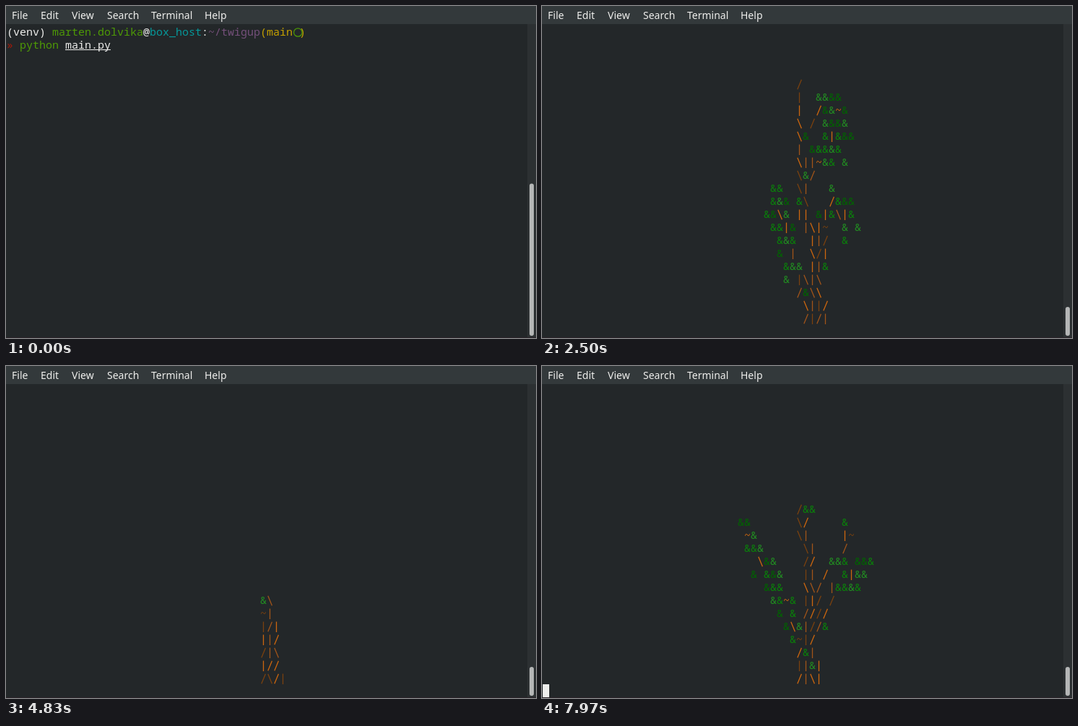
Recreate the animation shown at these times as an HTML page with a canvas. Size 734 by 459 pixels, loop 8000 ms.

```html
<!DOCTYPE html>
<html lang="en">
<head>
<meta charset="utf-8">
<title>Terminal trees</title>
<style>
  html, body { margin: 0; width: 100%; height: 100%; overflow: hidden; background: #232729; }
  canvas { display: block; }
</style>
</head>
<body>
<canvas id="stage" width="734" height="459"></canvas>
<script>
const ctx = document.getElementById('stage').getContext('2d');
const LOOP = 8000;
const CELL_W = 9, CELL_H = 18, LEFT = 1, TOP = 26;
const LAST_ROW = 23, ART_COL = 30;

const MONO = '15px "Noto Sans Mono", "DejaVu Sans Mono", monospace';
const SANS = '14px "Noto Sans", "Open Sans", sans-serif';
const WHITE = '#eeeeec', GREEN = '#4e9a06', CYAN = '#06989a';
const PURPLE = '#75507b', YELLOW = '#c4a000', RED = '#a81808';

const LEAF = { a: '#006400', b: '#0a800a', c: '#228b22' };
const WOOD = { a: '#7a410f', b: '#a0541a', c: '#cc660f' };

const MENU = [['File', 8], ['Edit', 48], ['View', 91], ['Search', 140], ['Terminal', 201], ['Help', 275]];

// Each line: glyphs, then one tone per glyph. Capital tones appear on the last step.
const ART_TALL = String.raw`
.................& B
........./.....&|& aBCB
.........|..&&&&/& accaaCB
.........|../&&~&& ccaccaB
.........\./.&&&& cacaac
.........\&..&|&&& cabcbaa
.........|.&&&&& babbcb
.........\||~&&.& cbbccbc
.........\&/ acb
.....&&..\|...& bbabc
.....&&&.&\.../&&& bcabacbaa
....&&\&.||.&|&\|& baccccacbbcb
.....&&|&.|\|~..&.& bbcabccacc
......&&&..||/..& bcbcbab
......&.|..\/| abcac
.......&&&.||& bcccbb
.......&.|\|\ cabbb
........./&\\ babc
..........\||/ cbac
........../|/| babb`;

const ART_SMALL = String.raw`
......|.......&&& cacb
.......|......&~ bcc
........\..../&.& acbb
...\&&...|.&/ acacab
...&&&.&.||&& cabbccbc
...&.~~&\&\ abcaacb
......&&.&| ccbb
.........|/| abc
.........||/ cbc
........./|\ abb
.........|// ccc
........./\/| aaca`;

const ART_WIDE = String.raw`
........./&& ABB
&&.......\/.....& AAACB
.~&......\|.....|~ ccabca
.&&&......\|..../ bbcabb
...\&&....//..&&&.&&& cacacccbAAB
..&.&&&...||./..&|&& abacabcbccC
....&&&...\\/.|&&&& abbcbbbbbCb
.....&&~&.||/./ cbcbacaa
......&.&.//// abbcac
.......&\&|//& accbabb
........&~|/ baac
........./&| cbb
.........||&| abcc
........./|\| cbcc`;

// `bud` is a twig that a leaf replaces once its step is reached.
const TREES = [
  {
    art: ART_TALL, trunk: 42, lean: 0.013,
    bud: { row: 18, col: 43, ch: '|', tone: 'a', until: 6 },
    steps: [670, 770, 870, 970, 1070, 1130, 1200, 1270, 1370, 1470, 1600, 1700,
            1870, 1970, 2070, 2130, 2230, 2330, 2470, 2670],
    prompt: 2930, typed: 3470, enter: 4030, clear: 4065
  },
  {
    art: ART_SMALL, trunk: 40, lean: 0,
    bud: { row: 17, col: 39, ch: '~', tone: 'a', until: 7 },
    steps: [4130, 4330, 4470, 4530, 4600, 4670, 4830, 4930, 5030, 5130, 5270, 5400],
    prompt: 5700, typed: 6100, enter: 6630, clear: 6630
  },
  {
    art: ART_WIDE, trunk: 40, lean: 0,
    steps: [6630, 6830, 6930, 7000, 7100, 7170, 7330, 7430, 7500, 7600, 7700, 7770, 7770, 7970],
    prompt: LOOP, typed: LOOP, enter: LOOP, clear: LOOP
  }
];

const CURSOR_ON = [[500, 1130], [1700, 2330], [2930, 4600], [5200, 5870], [6100, 7170], [7770, LOOP]];

// Rows sprout from the ground up; glyphs away from the trunk follow later.
function parseTree(tree) {
  const lines = tree.art.trim().split('\n');
  const last = lines.length - 1;
  const cells = [];
  lines.forEach((line, i) => {
    const [glyphs, tones] = line.split(' ');
    const level = last - i;
    const centre = tree.trunk - tree.lean * level * level;
    let n = 0;
    [...glyphs].forEach((ch, x) => {
      if (ch === '.') return;
      const tone = tones[n++];
      const late = tone < 'a';
      const col = ART_COL + x;
      const lag = Math.min(4, Math.floor(0.7 * Math.abs(col - centre)));
      const born = late ? last : Math.max(level, Math.min(last - 1, level + lag));
      cells.push({ row: LAST_ROW - 1 - level, col, ch, tone: tone.toLowerCase(), born: level === last ? last : born });
    });
  });
  tree.cells = cells;
}
TREES.forEach(parseTree);

const cellX = col => LEFT + CELL_W * col;
const cellY = row => TOP + CELL_H * row;
const stepsDone = (tree, t) => tree.steps.filter(s => s <= t).length;

function write(text, col, row, color) {
  ctx.font = MONO;
  ctx.fillStyle = color;
  [...text].forEach((ch, i) => ctx.fillText(ch, cellX(col + i), cellY(row) + 15));
}

function line(x1, y1, x2, y2) {
  ctx.beginPath();
  ctx.moveTo(x1, y1);
  ctx.lineTo(x2, y2);
  ctx.stroke();
}

function drawCell({ ch, col, tone }, row) {
  if (ch === '&' || ch === '~') {
    write(ch, col, row, (ch === '&' ? LEAF : WOOD)[tone]);
    return;
  }
  const x = cellX(col), y = cellY(row);
  ctx.strokeStyle = WOOD[tone];
  ctx.lineWidth = 1.3;
  if (ch === '|') line(x + 4.5, y + 3.5, x + 4.5, y + 18);
  else if (ch === '/') line(x + 1.8, y + 17.3, x + 7.4, y + 3.7);
  else line(x + 1.8, y + 3.7, x + 7.4, y + 17.3);
}

function drawTree(tree, step, shift) {
  const bud = tree.bud;
  for (const cell of tree.cells) {
    if (cell.born > step) continue;
    const isBud = bud && step < bud.until && cell.row === bud.row && cell.col === bud.col;
    drawCell(isBud ? bud : cell, cell.row - shift);
  }
}

function drawPrompt(row, typed) {
  const parts = [['(venv) ', WHITE], ['marten.dolvika', GREEN], ['@', WHITE], ['box_host', CYAN],
                 [':', WHITE], ['~/twigup', PURPLE], ['(main', YELLOW]];
  let col = 0;
  for (const [text, color] of parts) {
    write(text, col, row, color);
    col += text.length;
  }
  write(')', col + 1, row, YELLOW);
  ctx.strokeStyle = GREEN;
  ctx.lineWidth = 1.2;
  ctx.beginPath();
  ctx.arc(cellX(col) + 7.3, cellY(row) + 10.5, 5.7, 0, Math.PI * 2);
  ctx.stroke();

  write('»', 0, row + 1, RED);
  if (!typed) return;
  write('python', 2, row + 1, GREEN);
  write('main.py', 9, row + 1, WHITE);
  ctx.fillRect(cellX(9), cellY(row + 1) + 16, 7 * CELL_W, 1);
}

function drawCursor(col, row, t) {
  if (!CURSOR_ON.some(([a, b]) => t >= a && t < b)) return;
  ctx.fillStyle = WHITE;
  ctx.fillRect(cellX(col), cellY(row), CELL_W, CELL_H);
}

function drawWindow(t) {
  ctx.fillStyle = '#232729';
  ctx.fillRect(0, 0, 734, 459);
  ctx.fillStyle = '#33393b';
  ctx.fillRect(0, 0, 734, 25);
  ctx.fillStyle = '#2c3032';
  ctx.fillRect(722, 25, 12, 434);
  ctx.fillStyle = '#2b2329';
  ctx.fillRect(0, 458, 734, 1);

  ctx.font = SANS;
  ctx.fillStyle = WHITE;
  for (const [label, x] of MENU) ctx.fillText(label, x, 18);

  // The thumb shrinks as every redraw adds a screen of scrollback.
  const screens = t < 530 ? 0 : 1 + stepsDone(TREES[0], t);
  const height = Math.max(40, 430 * 24 / (49 + 24 * screens));
  ctx.fillStyle = '#b4b6b6';
  ctx.beginPath();
  ctx.roundRect(725, 456 - height, 6, height, 3);
  ctx.fill();
}

function draw(t) {
  drawWindow(t);
  if (t < 530) {
    drawPrompt(0, true);
    drawCursor(0, 2, t);
    return;
  }
  const tree = TREES.find(tr => t < tr.clear) || TREES[2];
  const step = stepsDone(tree, t) - 1;
  const prompted = t >= tree.prompt, typed = t >= tree.typed, entered = t >= tree.enter;
  const shift = entered ? 2 : prompted ? 1 : 0;
  drawTree(tree, step, shift);
  if (prompted) drawPrompt(LAST_ROW - shift, typed);
  drawCursor(!prompted || entered ? 0 : typed ? 16 : 2, LAST_ROW, t);
}

const start = performance.now();
function tick() {
  draw((performance.now() - start) % LOOP);
  requestAnimationFrame(tick);
}
tick();
</script>
</body>
</html>
```
